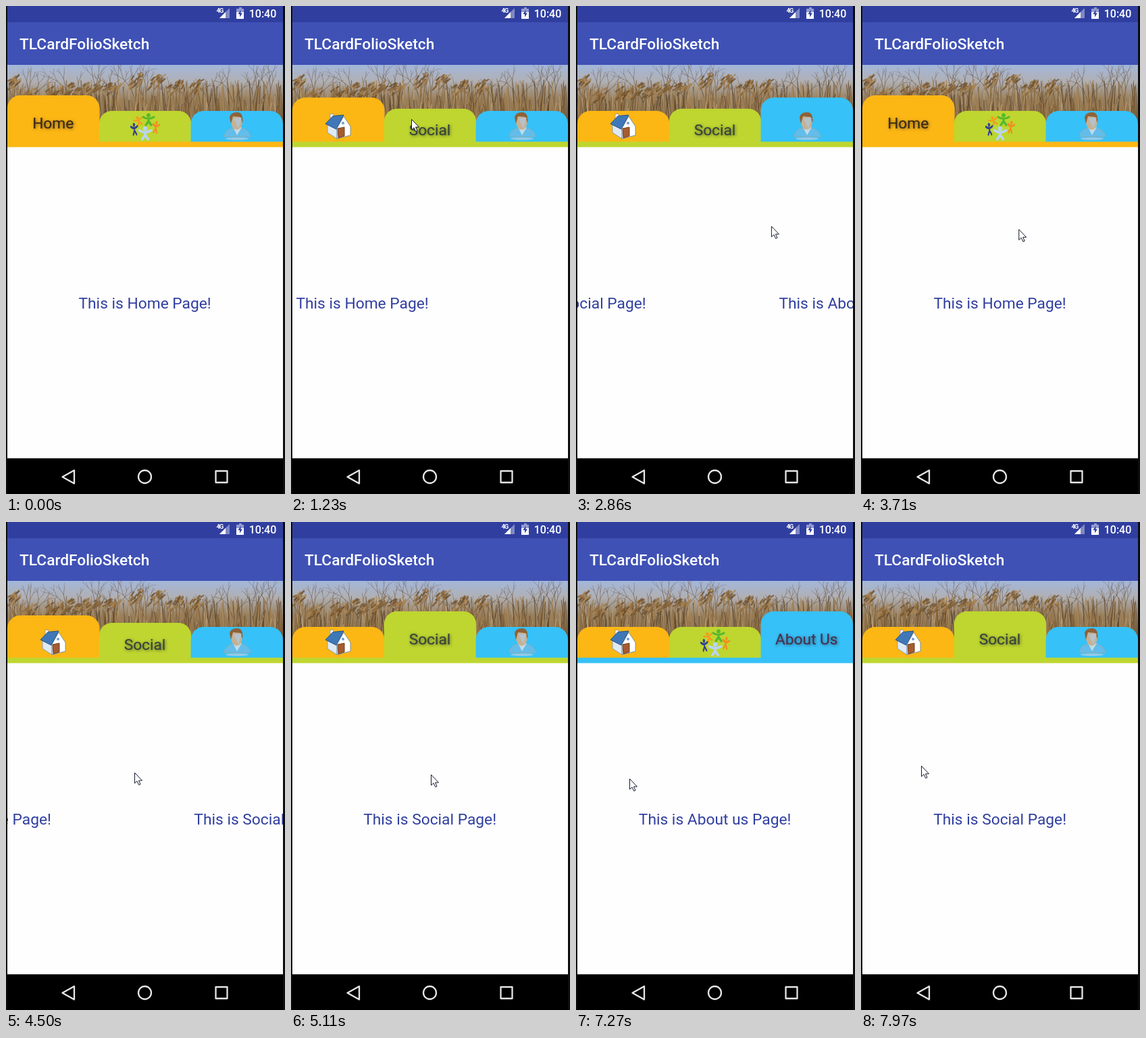
Recreate the animation shown at these times as an HTML page. Size 413 by 721 pixels, loop 8000 ms.

```html
<!DOCTYPE html>
<html lang="en">
<head>
<meta charset="utf-8">
<title>Tab pager</title>
<style>
  html, body { margin: 0; width: 100%; height: 100%; overflow: hidden; background: #0b0d0f; }
  svg { display: block; }
  text { font-family: Roboto, "Open Sans", sans-serif; font-size: 22.7px; }
  .medium { font-weight: 500; fill: #fff; }
  .mid { text-anchor: middle; }
  .label { stroke-width: .2px; filter: drop-shadow(1px 1px 2px rgba(40, 30, 40, .6)); }
  .page { fill: #303f9f; font-size: 22.78px; }
</style>
</head>
<body>
<svg id="stage" width="413" height="721" viewBox="0 0 413 721">
  <defs>
    <linearGradient id="sky" x1="0" y1="0" x2="0" y2="1">
      <stop offset="0" stop-color="#a3b7da"/>
      <stop offset=".2" stop-color="#b0b0b4"/>
      <stop offset=".42" stop-color="#98805f"/>
      <stop offset="1" stop-color="#7d5f38"/>
    </linearGradient>
    <g id="figure" fill="none" stroke="currentColor" stroke-width="3.200" stroke-linecap="round">
      <circle cy="-5.500" r="1.300"/>
      <path d="M-8-3 Q0 2 8-3 M0 0 V4 M-4 9 L0 3 L4 9"/>
    </g>
  </defs>

  <rect x="2" width="408" height="24" fill="#303f9f"/>
  <rect x="2" y="24" width="408" height="63" fill="#3f51b5"/>
  <text class="medium" x="20" y="64">TLCardFolioSketch</text>
  <text class="medium" x="359.700" y="16.500" style="font-size:16px">10:40</text>
  <text x="311.500" y="10" style="font-size:9.5px;font-weight:700;letter-spacing:-1.3px" fill="#fff">4G</text>
  <path d="M331 3 V18 H316Z" fill="#8089c4"/>
  <path d="M325 9 V18 H316Z" fill="#fff"/>
  <path d="M345 2 H349 V4 H352 V9 H341 V4 H345Z" fill="#929ad0"/>
  <path d="M341 9 H352 V19 H341Z" fill="#fff"/>
  <path d="M347.500 5.500 L343.500 12 H346 V16.500 L350 10.500 H347.500Z" fill="#303f9f"/>

  <svg x="2" y="87" width="408" height="121">
    <rect width="408" height="121" fill="url(#sky)"/>
    <g id="meadow" fill="none" stroke-linecap="round"/>
  </svg>

  <g id="tabs"></g>
  <rect id="strip" x="2" y="200.500" width="408" height="9"/>

  <g class="icon">
    <path d="M54 175 L68 182 V196 L54 187Z" fill="#dfe9f4" stroke="#7d93ab" stroke-width=".8"/>
    <path d="M58 159.500 H63 V170 H58Z" fill="#f5f5f5" stroke="#888" stroke-width=".7"/>
    <path d="M51 174 L62 162.500 L78 161 L67 182Z" fill="#3f78b8" stroke="#275282"/>
    <path d="M78 163 L88 178 V191 L68 196 V181Z" fill="#fff" stroke="#5b7fa8" stroke-width=".8"/>
    <path d="M69 181 L79 179 V192 L70 195Z" fill="#a65b30" stroke="#71401f"/>
    <circle cx="77" cy="173" r="2" fill="#6b9bd1"/>
  </g>
  <g class="icon">
    <use href="#figure" transform="translate(211 167)" color="#55b82e"/>
    <use href="#figure" transform="translate(196 169) rotate(-22) scale(.75)" color="#f79a1d"/>
    <use href="#figure" transform="translate(222 178) rotate(8) scale(.6 1)" color="#f58a20"/>
    <use href="#figure" transform="translate(190 181) rotate(-6) scale(.6 1)" color="#333f91"/>
    <use href="#figure" transform="translate(206 187) scale(1.100)" color="#b9d5fa"/>
  </g>
  <g class="icon">
    <ellipse cx="342" cy="196" rx="17" ry="2" fill="#8fcbe9"/>
    <path d="M323 193 Q324 183 336 180 H348 Q360 183 362 193Z" fill="#62bdea" stroke="#a9a5a0" stroke-width=".8"/>
    <path d="M336 179 L342 191 L349 179Z" fill="#c2dbe8"/>
    <ellipse cx="341.500" cy="171" rx="8.500" ry="11.500" fill="#c6b193"/>
    <path d="M333 174 L331 165 Q332 157 342 157 Q352 157 350 173 L347 164 L336 163Z" fill="#8d6239"/>
    <path d="M337 166 L349 165 L344 181Z" fill="#b3c4d2" opacity=".9"/>
  </g>
  <g id="labels"></g>

  <rect x="2" y="208.500" width="408" height="460" fill="#fefefe"/>
  <svg x="2" y="208" width="408" height="460"><g id="pages"></g></svg>

  <rect x="2" y="668.500" width="408" height="53"/>
  <g fill="none" stroke="#e6e6e6" stroke-width="2.300" stroke-linejoin="round">
    <path d="M101 686 V705.500 L83.500 695.700Z"/>
    <circle cx="205.500" cy="695.500" r="9.500"/>
    <rect x="310.500" y="687" width="17" height="17"/>
  </g>

  <path id="cursor" d="M.5 .5 V16 L4 12.800 L6.700 18.500 L9 17.500 L6.500 12 H11.500Z" fill="#fff" stroke="#151a2c"/>
</svg>

<script>
const LOOP = 8000, WIDTH = 408, TAB = 135.8, MOVE = 260, SETTLE = 220, RISE = 300;
const tabs = [
  { name: 'Home', page: 'Home', color: '#fcb714', ink: '#3b2b14' },
  { name: 'Social', page: 'Social', color: '#bed62f', ink: '#36463c' },
  { name: 'About Us', page: 'About us', color: '#36c1f8', ink: '#4a3150' }
];
// Pointer stops: [arrival, x, y]; each move takes at most MOVE
const stops = [
  [290, 271, 533], [430, 144, 213], [690, 170, 154], [1000, 178, 167], [1780, 307, 179],
  [2390, 150, 325], [2810, 295, 325], [3090, 140, 327], [3520, 232, 329], [3950, 300, 365],
  [4440, 190, 370], [5110, 207, 373], [5340, 342, 358], [5500, 275, 364], [5910, 190, 366],
  [6000, 230, 366], [6200, 104, 364], [6760, 60, 372], [7270, 79, 379], [7690, 205, 375], [7960, 89, 360]
];
// Clicks and swipes: [press, release, tab reached]
const gestures = [
  [-1000, -1000, 0], [1160, 1160, 1], [1860, 1860, 2], [2550, 2790, 1],
  [3260, 3400, 0], [4180, 4400, 1], [5340, 6700, 2], [7430, 7600, 1]
];

const $ = id => document.getElementById(id);
const mix = (a, b, p) => a + (b - a) * p;
const smooth = p => { p = Math.min(1, Math.max(0, p)); return p * p * (3 - 2 * p); };

function add(parent, tag, attrs, text = '') {
  const el = document.createElementNS('http://www.w3.org/2000/svg', tag);
  for (const key in attrs) el.setAttribute(key, attrs[key]);
  el.textContent = text;
  return parent.appendChild(el);
}

function pointer(t) {
  const next = stops.findIndex(s => s[0] > t);
  const [end, x, y] = stops.at(next);
  if (next < 1) return [x, y];
  const [left, x0, y0] = stops[next - 1];
  const start = Math.max(left, end - MOVE);
  const p = smooth((t - start) / (end - start));
  return [mix(x0, x, p), mix(y0, y, p)];
}

// The page follows the pointer while pressed, then settles on its tab
function scroll(t) {
  const i = gestures.findLastIndex(g => g[0] <= t);
  const [press, release, tab] = gestures[i];
  const base = i ? gestures[i - 1][2] * WIDTH : 0;
  const dragged = base + pointer(press)[0] - pointer(Math.min(t, release))[0];
  return mix(dragged, tab * WIDTH, smooth((t - release) / SETTLE));
}

let seed = 7;
const rnd = (a, b) => mix(a, b, (seed = seed * 16807 % 2147483647) / 2147483647);
const stroke = (d, color, width) =>
  add($('meadow'), 'path', { d, stroke: color, 'stroke-width': width, opacity: .75 });

function branch(x, y, len, angle, width) {
  if (len < 6) return;
  const x2 = x + len * Math.sin(angle), y2 = y - len * Math.cos(angle);
  stroke(`M${x} ${y}L${x2} ${y2}`, '#66513f', width);
  for (const side of [-1, 1]) branch(x2, y2, len * rnd(.6, .8), angle + side * rnd(.1, .5), width * .75);
}

function drawMeadow() {
  const colors = ['#6b4e2b', '#8d6a3c', '#a9834f', '#54432f', '#bda27a'];
  for (let x = 8; x < WIDTH; x += rnd(18, 36)) branch(x, 85, rnd(22, 32), rnd(-.1, .1), 1.5);
  for (let i = 0; i < 420; i++) {
    const x = rnd(0, WIDTH);
    stroke(`M${x} 121Q${x} 85 ${x + rnd(-9, 9)} ${rnd(22, 68)}`, colors[i % 5], rnd(.6, 1.5));
  }
  for (let x = 14; x < 290; x += rnd(20, 36)) {
    const y = rnd(14, 42);
    stroke(`M${x} ${y}Q${x - 8} 70 ${x - 6} 121`, colors[1], 1.2);
    for (let i = 0; i < 26; i++) {
      const dx = rnd(-12, 9);
      stroke(`M${x + dx} ${y + rnd(-7, 9) - dx / 2}l${rnd(-6, -2)} ${rnd(2, 6)}`, colors[i % 3], 2.2);
    }
  }
}

drawMeadow();
const icons = document.querySelectorAll('.icon');
tabs.forEach((tab, i) => {
  const x = 2 + i * TAB;
  tab.shape = add($('tabs'), 'rect', { x, width: 410 - TAB * (2 - i) - x, height: 100, rx: 19, fill: tab.color });
  tab.label = add($('labels'), 'text', { x: x + 67.7, class: 'mid label', fill: tab.ink, stroke: tab.ink }, tab.name);
  tab.icon = icons[i];
  add($('pages'), 'text', { x: 203.6 + i * WIDTH, y: 239, class: 'mid page' }, `This is ${tab.page} Page!`);
});

function draw(t) {
  const last = gestures.findLastIndex(g => g[1] <= t);
  const [, start, current] = gestures[last];
  const previous = last ? gestures[last - 1][2] : -1;
  const rise = smooth((t - start) / RISE);
  tabs.forEach((tab, i) => {
    const up = i === current ? rise : i === previous ? 1 - rise : 0;
    tab.shape.setAttribute('y', mix(155, 132, up));
    tab.label.setAttribute('y', mix(192.5, 181, up));
    tab.label.style.display = i === current ? '' : 'none';
    tab.icon.style.display = i === current ? 'none' : '';
  });
  $('strip').setAttribute('fill', tabs[current].color);
  $('pages').setAttribute('transform', `translate(${-scroll(t)})`);
  $('cursor').setAttribute('transform', `translate(${pointer(t)})`);
  $('cursor').style.display = t < stops[0][0] ? 'none' : '';
}

function tick() {
  draw(performance.now() % LOOP);
  requestAnimationFrame(tick);
}
tick();
</script>
</body>
</html>
```
